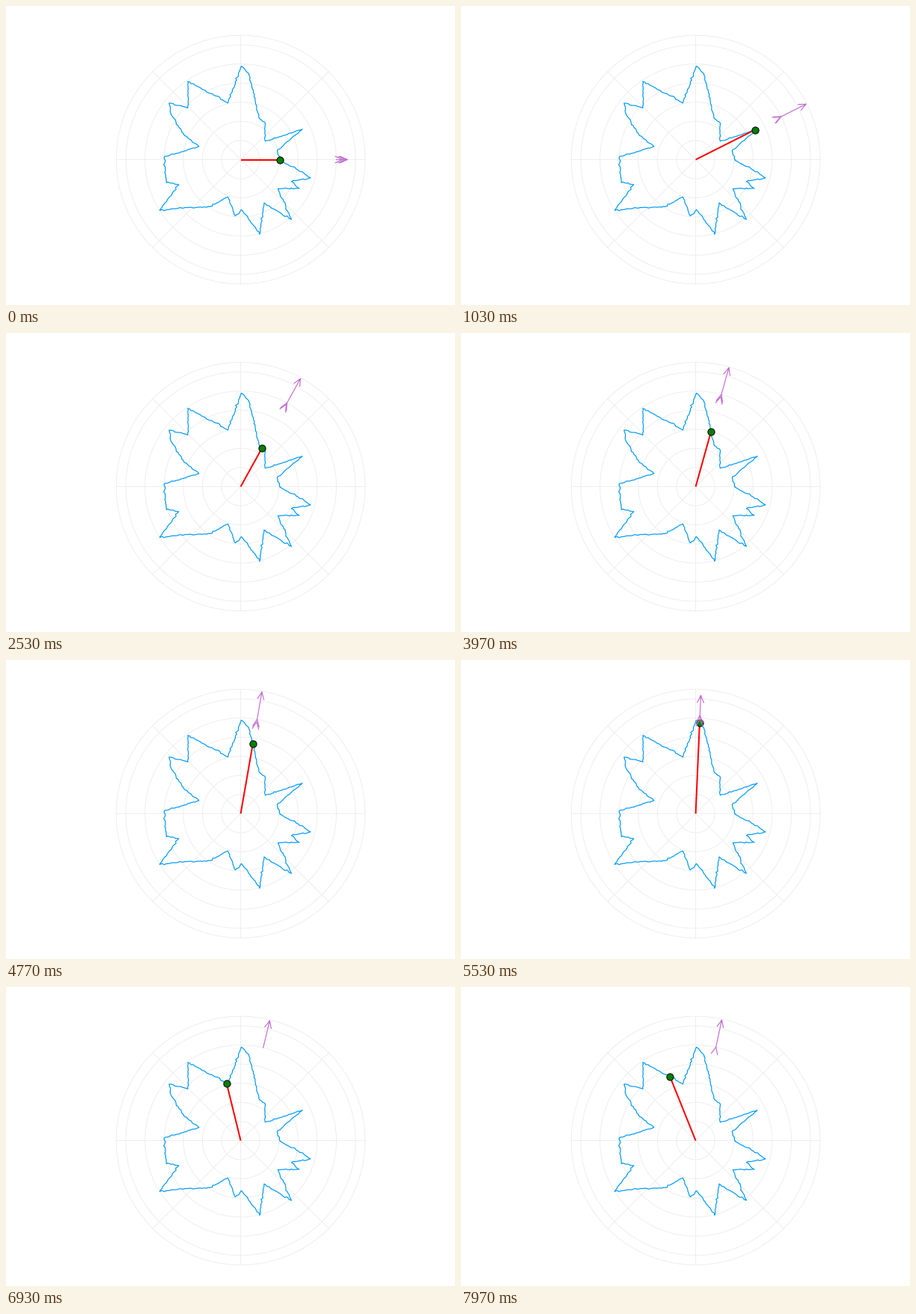
A matplotlib script that plays this animation: 600 by 400 pixels, repeating every 8 s.

```python
import numpy as np
import matplotlib.pyplot as plt
from matplotlib.animation import FuncAnimation

W, H, DPI = 600, 400, 100
FRAMES, LOOP = 240, 8000
CENTER = np.array([313.6, 205.5])
STEP, RIM = 25.58, 166.3
CREST = 175          # the arrow lets go of the sweep here
PX = 72 / DPI
GAP = [(np.nan, np.nan)]

# spikes and notches of the outline, counter-clockwise from the right
SPIKES = [
    (366, 206), (362, 193), (395.5, 164.5), (346, 180.5), (346, 156),
    (338, 150), (324, 90), (314, 80), (296, 129.5), (280, 120),
    (242.5, 100.5), (242.5, 136), (217.5, 129.5), (220, 144), (238, 173),
    (257.5, 187.5), (211, 201.5), (214, 236), (230.5, 238.5), (205, 273),
    (237, 270), (272, 268), (296, 255), (306, 280.5), (314, 272),
    (323, 283), (338.5, 305), (344.5, 263), (381, 285), (363, 244),
    (391.5, 243.5), (381, 234.5), (406.5, 229.5), (390, 219),
]


def along(deg):
    a = np.radians(deg)
    return np.array([np.cos(a), -np.sin(a)])


def polar(deg, r):
    return CENTER + r * along(deg)


def roughen(corners):
    """Join the corners with slightly ragged edges."""
    rng = np.random.default_rng(4)
    corners = np.array(corners, float) + 0.4
    pts = []
    for a, b in zip(corners, np.roll(corners, -1, axis=0)):
        n = max(1, int(np.hypot(*(b - a)) / 2.5))
        for k in range(n):
            jitter = rng.normal(0, 0.5, 2) if k else 0
            pts.append(a + (b - a) * k / n + jitter)
    return np.array(pts + pts[:1])


def sweep(i):
    """Quick start, then a steady turn with a slow sway."""
    lag = 37.3 * max(0, 1 - i / 85) ** 1.67
    sway = 1.9 * np.sin(2 * np.pi * (i - 119) / 120)
    return max(0, 37.3 + 0.312 * i - lag - sway)


def aim(i):
    """Arrow direction: the sweep up to the crest, then it eases back."""
    if i <= CREST:
        return sweep(i)
    u = min(1, (i - CREST) / 20)
    ease = u * u * (3 - 2 * u)
    rest = 76.4 + 0.044 * (i - 207)
    return sweep(CREST) * (1 - ease) + rest * ease


def head(deg, r):
    """Open arrowhead pointing outwards, followed by a gap."""
    out = along(deg)
    side = np.array([out[1], -out[0]])
    tip = polar(deg, r)
    back = tip - 9.5 * out
    return [back + 4.3 * side, tip, back - 4.3 * side] + GAP


outline = roughen(SPIKES)
dx, dy = (outline - CENTER).T
bearing = np.degrees(np.arctan2(-dy, dx))
order = np.argsort(bearing)
bearing, reach = bearing[order], np.hypot(dx, dy)[order]

fig = plt.figure(figsize=(W / DPI, H / DPI), dpi=DPI, facecolor="white")
ax = fig.add_axes([0, 0, 1, 1])
ax.set_xlim(0, W)
ax.set_ylim(H, 0)
ax.axis("off")

grid = dict(color="#ededed", lw=0.9 * PX, snap=False)
turn = np.linspace(0, 360, 241)
for r in [STEP * k for k in range(1, 7)] + [RIM]:
    ax.plot(*(CENTER[:, None] + r * along(turn)), **grid)
for deg in range(0, 180, 45):
    ax.plot(*np.array([polar(deg, -RIM), polar(deg, RIM)]).T, **grid)

ax.plot(*outline.T, color="#009afa", lw=1.2 * PX, solid_joinstyle="round")
ray, = ax.plot([], [], color="red", lw=2 * PX, solid_capstyle="butt")
dot, = ax.plot([], [], "o", ms=9.2 * PX, mfc="green", mec="black", mew=PX)
arrow, = ax.plot([], [], color="#c371d2", lw=1.2 * PX,
                 solid_joinstyle="miter")


def draw(i):
    deg = sweep(i)
    spot = polar(deg, np.interp(deg, bearing, reach))
    ray.set_data(*np.array([CENTER, spot]).T)
    dot.set_data(*spot[:, None])

    # the arrow is short at the start and again near the crest
    pinch = np.exp(-i) + 0.3 * np.exp(-((i - 165) / 4) ** 2)
    tip, base = 165 - 22.5 * pinch, 128 + 12 * pinch
    space = 1 + i / 60 + 3 * pinch
    barbs = 2 if i <= CREST else int(i > CREST + 40)

    deg = aim(i)
    path = [polar(deg, 128), polar(deg, tip)] + GAP + head(deg, tip)
    for k in range(barbs):
        path += head(deg, base - space * k)
    arrow.set_data(*np.array(path).T)
    return ray, dot, arrow


anim = FuncAnimation(fig, draw, frames=FRAMES, interval=LOOP / FRAMES,
                     repeat=True, repeat_delay=0, blit=False)
plt.show()
```
